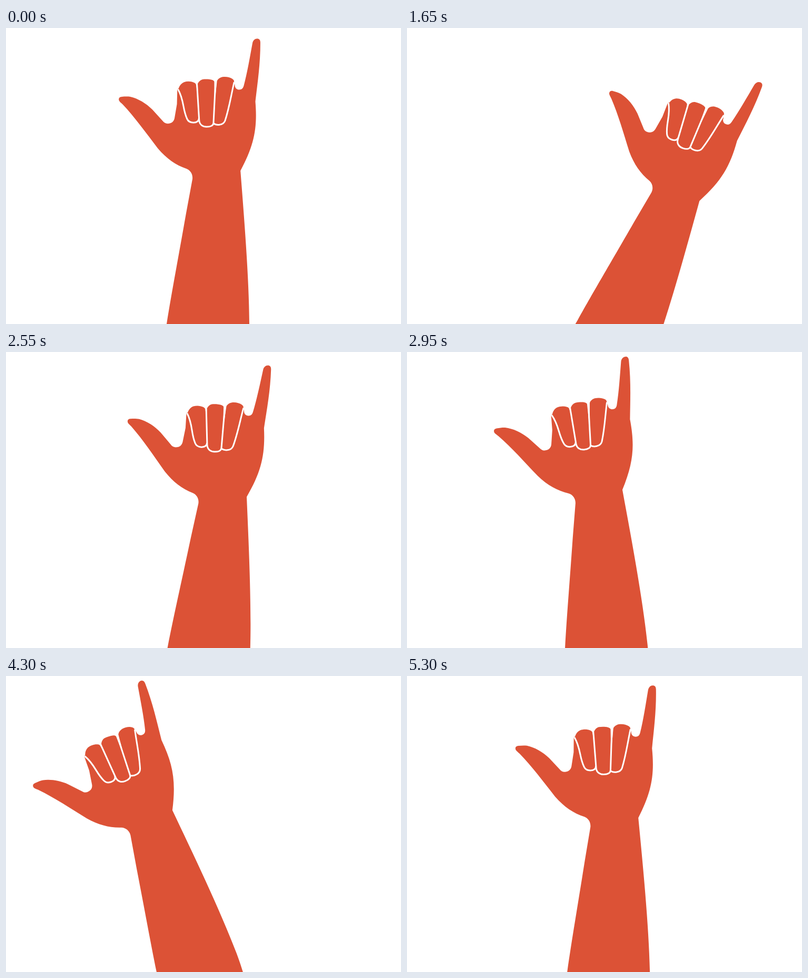
An HTML page with a canvas that plays this animation: 750x564 px, repeating every 5.35 s.

```html
<!DOCTYPE html>
<html lang="en">
<head>
<meta charset="utf-8">
<title>Waving hand</title>
<style>
html, body { margin: 0; width: 100%; height: 100%; overflow: hidden; background: #fff; }
canvas { display: block; }
</style>
</head>
<body>
<canvas id="stage" width="750" height="564"></canvas>
<script>
const ctx = document.getElementById('stage').getContext('2d');

const LOOP = 5350, STEP = 50;
const SWING = 21.36;            // degrees to either side
const REST = 0.5;               // angle at which the paths are drawn
const PIVOT = [336.4, 615];

const hand = new Path2D(`
  M214.3 137 C213.8 133 216 131.2 220 130.9 C226 130.4 232 130.3 236 131
  C251 134.5 266 143.5 278 155.5 L297 176.5 C300 180.5 303 182.2 307 182.2
  C313.5 182.2 318.5 179 320 172 L324.6 145 L325.3 117.5
  L328 114.5 C330 109 333 105.5 338 103.2 C344 101.2 351 101.3 357 104
  C360 105.3 361 107 361.2 110 L362.6 118 L364.1 106
  C366 102 369 99 373 97.9 C379 97.2 386 97.4 391 98.8
  C394 100 395.6 101 395.5 103 L395.5 130 L397.5 130 L400.7 101
  C402 97.5 406 94.5 411 93.3 C418 92.3 425 93.6 430 97
  C432.5 98.8 433.4 100.5 433 103 L434.5 108
  C434.3 114 438 117.5 443 117.5 C448 117.5 450.3 114.5 451.5 110
  C458 86 463 56 468 29 C469 23.5 473 20.2 477.3 20.3
  C481.5 20.6 483 23.5 483 28 C483 68 478 102 473.5 140
  C477.5 190 472 222 445.2 272
  C452 360 462 480 462 570 C462 585 461 608 458 640 L289 650
  L305 564 C316 496 325 450 342 353 L354 288
  C355 279 350.5 271.5 343 268.3 C322 261 305 249 288 229
  C266 200 244 169.5 222 146 C218 142 214.8 140 214.3 137 Z`);

const creases = new Path2D(`
  M326.5 116.5 C333 128 335 138 337 149 C339 160 341 167 344 173.5
  C346 178 351 180.2 356 180.2 C362 180.2 366 177.5 366.5 172
  M362.6 107 L366.8 176 C367.5 184.5 374 188.3 381 188.3
  C388 188.3 394 186 394 180.5 L396.5 130 L398.2 104
  M393.8 181.5 C399 185.8 412.5 186 416 176.5
  C424 152 427 130 433.3 103`);

// Linear swing with a pause at each end.
function angleAt(t) {
  const half = ms => Math.min(Math.max(ms / 2150, 0), 1);
  if (t < 1050) t += LOOP;
  return t < 4250
    ? SWING * (1 - 2 * half(t - 1600))
    : SWING * (2 * half(t - 4250) - 1);
}

function draw(now) {
  const t = Math.floor((now + 0.5) / STEP) * STEP % LOOP;
  ctx.setTransform(1, 0, 0, 1, 0, 0);
  ctx.fillStyle = '#fff';
  ctx.fillRect(0, 0, 750, 564);
  ctx.translate(...PIVOT);
  ctx.rotate((angleAt(t) - REST) * Math.PI / 180);
  ctx.translate(-PIVOT[0], -PIVOT[1]);
  ctx.fillStyle = '#dc5236';
  ctx.fill(hand);
  ctx.strokeStyle = '#fff';
  ctx.lineWidth = 3;
  ctx.lineJoin = 'round';
  ctx.stroke(creases);
  requestAnimationFrame(draw);
}
draw(0);
</script>
</body>
</html>
```
